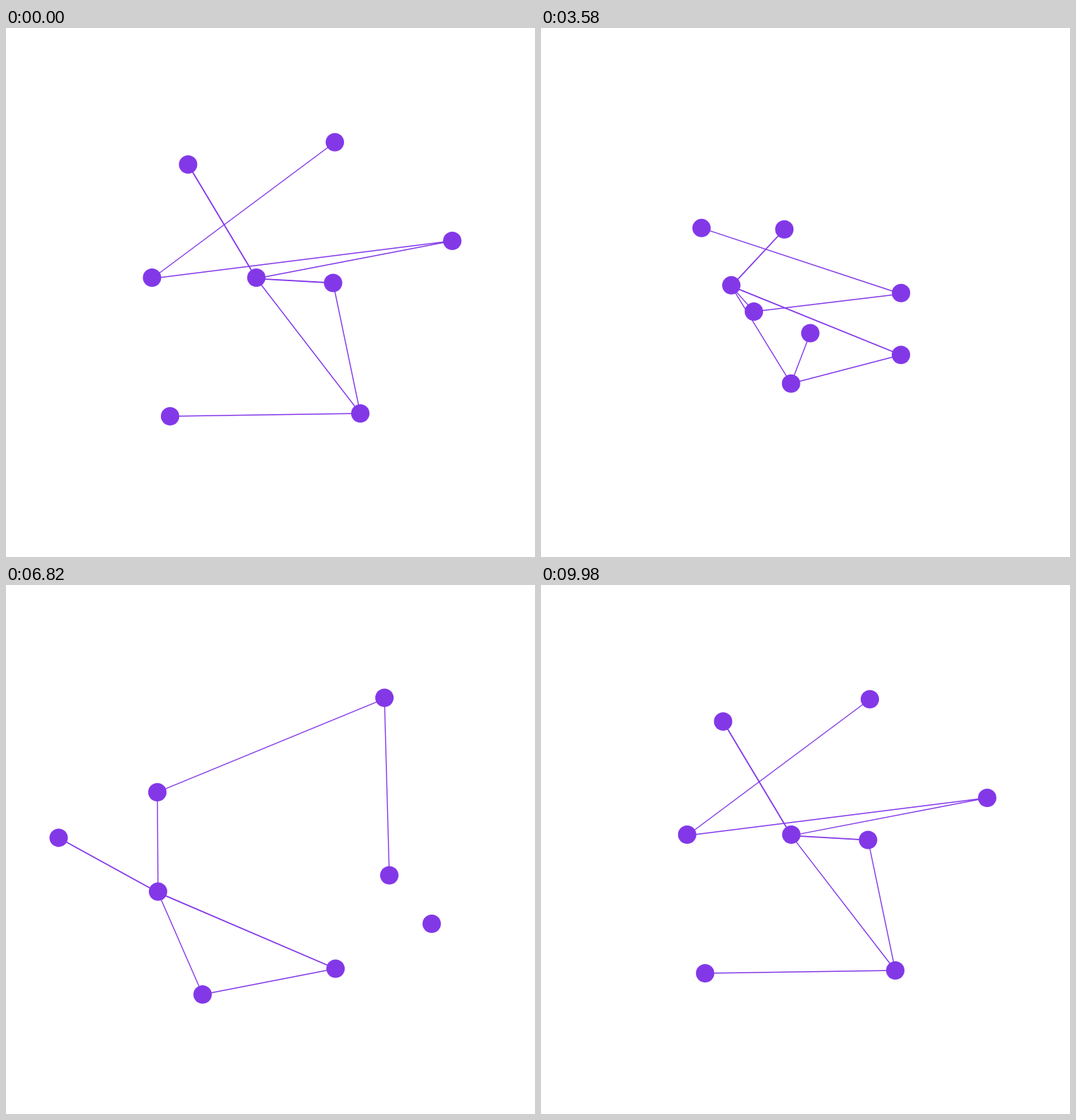
Write an HTML page with a canvas that moves like this. It is 748 by 748 pixels and loops after 10000 ms.

```html
<!DOCTYPE html>
<html lang="en">
<head>
<meta charset="utf-8">
<title>Drifting network</title>
<style>
html, body { margin: 0; width: 100%; height: 100%; overflow: hidden; background: #fff; }
canvas { display: block; }
</style>
</head>
<body>
<canvas id="stage" width="748" height="748"></canvas>
<script>
const ctx = document.getElementById('stage').getContext('2d');
const SIZE = 748;
const LOOP = 10;
const COLOR = '#8338e8';
const RADIUS = 13;
const BLINK = 0.35; // seconds an edge stays hidden on each side of its pose
const SAG = 1.3;    // lines meet the two inner hubs slightly below centre

const edges = ['AE', 'BD', 'CD', 'CE', 'EF', 'EG', 'FG', 'GH'];
const strong = ['AE', 'EF'];
const hubs = 'DE';

// Key poses; the motion between them is a smooth spline.
const poses = [
  { t: 0, A: [257.5, 193], B: [465, 161.5], C: [631, 301], D: [206.5, 353],
    E: [354, 353], F: [462.5, 360.5], G: [501, 545], H: [232, 549] },
  { t: 1.02, hide: 'CE', A: [247, 250.5], B: [291, 141.5], C: [500, 256], D: [340.5, 440],
    E: [290, 424], F: [432, 449], G: [493, 600], H: [129, 491] },
  { t: 2.56, A: [257.5, 295.5], B: [123, 293.5], C: [371.5, 338.5], D: [481.5, 500],
    E: [263, 413], F: [522, 411], G: [383, 560], H: [199, 450.5] },
  { t: 4.66, hide: 'CD', A: [373, 295.5], B: [403, 243.5], C: [235.5, 410.5], D: [504.5, 217.5],
    E: [264, 345], F: [462, 551.5], G: [346, 487], H: [558, 417] },
  { t: 6.82, hide: 'GH', A: [74.5, 357.5], B: [542, 410.5], C: [214, 293], D: [535, 159.5],
    E: [215, 433.5], F: [466, 542.5], G: [278, 579], H: [602, 479] },
  { t: 8.32, hide: 'FG', A: [147.5, 188.5], B: [498, 363], C: [310, 281.5], D: [624, 184],
    E: [235, 409.5], F: [406.5, 503.5], G: [318, 528.5], H: [456, 567] }
];
poses.push({ ...poses[0], t: LOOP });

const names = [...'ABCDEFGH'];
const spans = poses.slice(1).map((pose, i) => pose.t - poses[i].t);

// Velocities that keep acceleration continuous, at rest where the loop closes.
function velocities(values) {
  const v = values.map(() => 0);
  const slopes = spans.map((h, i) => (values[i + 1] - values[i]) / h);
  for (let round = 0; round < 40; round++) {
    for (let i = 1; i < spans.length; i++) {
      const before = spans[i - 1], after = spans[i];
      v[i] = (3 * (slopes[i - 1] * after + slopes[i] * before) -
        v[i - 1] * after - v[i + 1] * before) / (2 * (before + after));
    }
  }
  return v;
}

function spline(values) {
  const v = velocities(values);
  return t => {
    const i = poses.findIndex(pose => pose.t > t) - 1;
    const h = spans[i], s = (t - poses[i].t) / h, r = 1 - s;
    return r * r * (1 + 2 * s) * values[i] + s * s * (3 - 2 * s) * values[i + 1] +
      h * s * r * (r * v[i] - s * v[i + 1]);
  };
}

const paths = names.map(name => [0, 1].map(axis => spline(poses.map(pose => pose[name][axis]))));

const isHidden = (edge, t) =>
  poses.some(pose => pose.hide === edge && Math.abs(t - pose.t) < BLINK);

function draw(t) {
  const at = {};
  names.forEach((name, i) => { at[name] = paths[i].map(path => path(t)); });
  const anchor = name => [at[name][0], at[name][1] + (hubs.includes(name) ? SAG : 0)];

  ctx.fillStyle = '#fff';
  ctx.fillRect(0, 0, SIZE, SIZE);
  ctx.strokeStyle = ctx.fillStyle = COLOR;

  for (const edge of edges) {
    if (isHidden(edge, t)) continue;
    ctx.lineWidth = strong.includes(edge) ? 1.8 : 1.4;
    ctx.beginPath();
    ctx.moveTo(...anchor(edge[0]));
    ctx.lineTo(...anchor(edge[1]));
    ctx.stroke();
  }
  for (const name of names) {
    ctx.beginPath();
    ctx.arc(...at[name], RADIUS, 0, Math.PI * 2);
    ctx.fill();
  }
}

const start = performance.now();
function tick() {
  draw((performance.now() - start) / 1000 % LOOP);
  requestAnimationFrame(tick);
}
tick();
</script>
</body>
</html>
```
